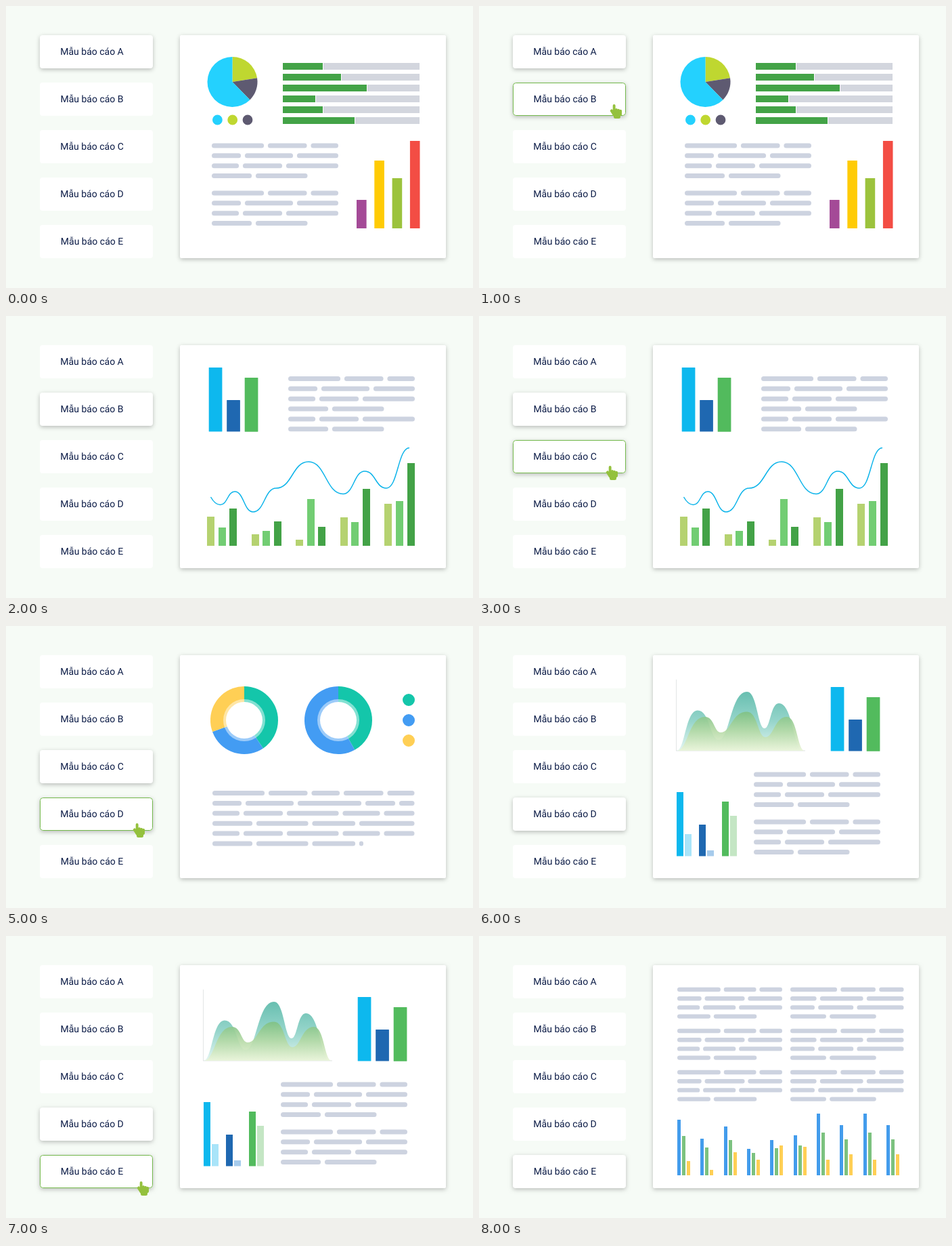
An HTML page with a canvas that plays this animation: 690 px wide and 416 px high, repeating every 9000 ms.

```html
<!DOCTYPE html>
<html lang="vi">
<head>
<meta charset="utf-8">
<style>
html, body { margin: 0; width: 690px; height: 416px; overflow: hidden; background: #f6fbf6; }
canvas { display: block; }
</style>
</head>
<body>
<canvas id="stage" width="690" height="416"></canvas>
<script>
const ctx = document.getElementById('stage').getContext('2d');
const STEP = 1000, STEPS = 9;
const GREY = '#cdd3e0', CYAN = '#0db8ee', NAVY = '#1f68b1', LEAF = '#52bb5d';
const TEAL = '#14c6aa', BLUE = '#439cf3', GOLD = '#ffcf55';

function rect(x, y, w, h, color) {
  ctx.fillStyle = color;
  ctx.fillRect(x, y, w, h);
}

function round(x, y, w, h, r, color) {
  ctx.fillStyle = color;
  ctx.beginPath();
  ctx.roundRect(x, y, w, h, r);
  ctx.fill();
}

// Angles in degrees, clockwise from the top
function slice(x, y, r, from, to, color) {
  const rad = a => (a - 90) * Math.PI / 180;
  ctx.fillStyle = color;
  ctx.beginPath();
  ctx.moveTo(x, y);
  ctx.arc(x, y, r, rad(from), rad(to));
  ctx.fill();
}

const dot = (x, y, r, color) => slice(x, y, r, 0, 360, color);

function pie(x, y, r, parts) {
  let from = 0;
  for (const [to, color] of parts) {
    slice(x, y, r, from, to, color);
    from = to;
  }
}

function card(x, y, w, h, r, raised) {
  ctx.save();
  if (raised) {
    ctx.shadowColor = 'rgba(0,0,0,.25)';
    ctx.shadowBlur = 6;
    ctx.shadowOffsetY = 2;
  }
  round(x, y, w, h, r, '#fff');
  ctx.restore();
}

// Level tangents at every point; high and low set how round crests and troughs are
function wave(points, high, low) {
  ctx.beginPath();
  ctx.moveTo(...points[0]);
  for (let i = 1; i < points.length; i++) {
    const [x0, y0] = points[i - 1], [x1, y1] = points[i];
    const w = x1 - x0, up = y1 < y0;
    ctx.bezierCurveTo(x0 + w * (up ? low : high), y0, x1 - w * (up ? high : low), y1, x1, y1);
  }
}

// Upright bars of the given heights
function columns(heights, x, step, w, base, color) {
  heights.forEach((h, i) => rect(Math.round(x + i * step), base - h, w, h, color));
}

// Middles of the gaps between dashes, one list per kind of text line
const CUTS = [[80, 143.5, 191, 255.5], [46, 123, 223, 273], [43, 107, 189.5, 250.5], [62, 144.5, 214]];

function dashes(kind, end, x, y, scale = 1) {
  const h = scale < 1 ? 6.4 : 7;
  let from = 0;
  for (const cut of [...CUTS[kind].filter(c => c < end), end + 2.9]) {
    round(x + from * scale, y - h / 2, (cut - 2.9 - from) * scale, h, h / 2, GREY);
    from = cut + 2.9;
  }
}

function paragraph(x, y, kinds = [0, 1, 2, 3], scale = 1) {
  const gap = scale < 1 ? 13.2 : 14.85;
  kinds.forEach((k, i) => dashes(k, k === 3 ? 141.5 : 187, x, y + i * gap, scale));
}

function trio(x, y) {
  [[94.5, 0, CYAN], [46.5, 48, NAVY], [79.8, 15, LEAF]].forEach(
    ([h, top, c], i) => round(x + i * 26.5, y + top, 19.7, h, 0.5, c));
}

function pageA() {
  const colors = ['#24d1fe', '#bfd730', '#5e5a71'];
  pie(334.5, 112, 37, [[81, colors[1]], [135.5, colors[2]], [360, colors[0]]]);
  colors.forEach((c, i) => dot(312.4 + i * 22.3, 168, 7.4, c));

  [59, 86, 124, 48, 59, 106].forEach((w, i) => {
    const y = 84 + i * 16;
    rect(409, y, 202, 10, '#d3d6de');
    rect(409, y, w + 1, 10, '#fff');
    rect(409, y, w, 10, '#43a347');
  });
  paragraph(304, 206);
  paragraph(304, 276);
  [[42, '#a44a97'], [100, '#ffcb05'], [74, '#9cc33d'], [129, '#f34d44']].forEach(
    ([h, c], i) => rect(518 + i * 26.3, 328 - h, 14.6, h, c));
}

function pageB() {
  trio(299.7, 76);
  paragraph(417, 92.5, [0, 1, 2, 3, 2, 3]);
  columns([43, 17, 9, 42, 62], 297, 65.6, 11, 339, '#b5d270');
  columns([27, 22, 69, 35, 66], 313.6, 65.6, 11, 339, '#72cd73');
  columns([55, 36, 28, 84, 122], 330.2, 65.6, 11, 339, '#43a247');

  wave([[316.5, 278.5], [338, 259], [365, 289], [399, 254], [447, 215], [498, 262.5],
        [530, 229], [562, 254], [596, 194.5]], 0.5, 0.5);
  ctx.moveTo(302.5, 267);
  ctx.quadraticCurveTo(309, 278.5, 316.5, 278.5);
  ctx.strokeStyle = '#0db4ea';
  ctx.lineWidth = 1.5;
  ctx.stroke();
}

function donut(x, y, parts) {
  pie(x, y, 50, parts);
  dot(x, y, 31, 'rgba(255,255,255,.47)');
  dot(x, y, 27, '#fff');
}

function pageC() {
  donut(352, 139, [[146, TEAL], [250, BLUE], [360, GOLD]]);
  donut(491, 139, [[151, TEAL], [360, BLUE]]);
  [TEAL, BLUE, GOLD].forEach((c, i) => dot(595, 109 + i * 30, 9, c));
  [0, 1, 2, 3, 2, 3].forEach((kind, i) => {
    dashes(kind, i < 5 ? 298.5 : 223, 305, 246.5 + i * 14.9);
  });
}

function hill(points, top, colors) {
  const fill = ctx.createLinearGradient(0, top, 0, 184);
  colors.forEach((c, i) => fill.addColorStop(i / (colors.length - 1), c));
  wave(points, 0.58, 0.4);
  ctx.closePath();
  ctx.fillStyle = fill;
  ctx.fill();
}

function pageD() {
  rect(291, 79, 1, 105, '#e3e5e6');
  rect(291, 183.5, 191, 1, '#dfe3e3');
  hill([[292, 184], [323, 124.5], [354, 168], [396, 97], [422, 151], [443, 114], [479, 184]],
    97, ['#68bfb0', '#96d5cb', '#e4f6f3']);
  hill([[292, 184], [334, 134], [357, 157], [396, 126.5], [423, 164], [455, 134], [481, 184]],
    126, ['rgba(126,193,133,.95)', 'rgba(180,217,164,.88)', 'rgba(234,244,216,.9)']);
  trio(519.7, 90);

  [[94.5, CYAN, 32.5, '#a9e4f9'], [46.5, NAVY, 8.5, '#a6cbec'], [80.5, LEAF, 59.5, '#c4e6c4']].forEach(
    ([h, c, low, light], i) => {
      const x = Math.round(292 + i * 33.4);
      rect(x, 339.5 - h, 10, h, c);
      rect(x + 12, 339.5 - low, 10, low, light);
    });
  paragraph(406, 219);
  paragraph(406, 289);
}

function pageE() {
  for (let y = 79; y < 202; y += 61) {
    paragraph(293, y, undefined, 0.829);
    paragraph(460, y, undefined, 0.896);
  }
  const repeatLast = list => [...list, ...list.slice(-2)];
  const blue = repeatLast([82, 54, 72, 39, 52, 59, 91, 74]);
  const gold = repeatLast([21, 8, 34, 23, 44, 42, 23, 31]);
  columns(blue, 293, 34.35, 5, 353, '#439cec');
  columns(blue.map(h => Math.round(h * 0.58 + 10)), 300, 34.35, 5, 353, '#7cc27f');
  columns(gold, 307, 34.35, 5, 353, GOLD);
}

const pages = [pageA, pageB, pageC, pageD, pageE];

function hand(x, y) {
  const color = '#94c13d';
  round(x + 4.7, y, 3.9, 16, 1.95, color);
  for (let i = 0; i < 3; i++) round(x + 8 + i * 3.1, y + 5.9 + i * 0.9, 3.8, 9, 1.9, color);
  round(x + 4.2, y + 9, 13.7, 8.5, [0, 0, 4, 4], color);
  round(x + 6, y + 12, 10, 9, 2.5, color);
  ctx.save();
  ctx.translate(x + 1.6, y + 8);
  ctx.rotate(-0.6);
  round(-1.9, 0, 4.2, 13, 2, color);
  ctx.restore();
}

function button(i, active, hover) {
  const y = 43 + i * 70;
  card(50, y, 167, 49, 4, active || hover);
  if (hover) {
    ctx.strokeStyle = '#74b94c';
    ctx.lineWidth = 1;
    ctx.beginPath();
    ctx.roundRect(50.5, y + 0.5, 166, 48, 4);
    ctx.stroke();
  }
  ctx.fillStyle = '#0c1c47';
  ctx.fillText('Mẫu báo cáo ' + 'ABCDE'[i], 127, y + 29);
}

const stops = [[193, 145], [187, 221], [187, 291], [193, 362]];

function draw(now) {
  const step = Math.floor(now / STEP) % STEPS;
  const active = step >> 1;
  const hover = step % 2 ? active + 1 : -1;

  rect(0, 0, 690, 416, '#f6fbf6');
  ctx.font = '14px Roboto, sans-serif';
  ctx.textAlign = 'center';
  ctx.textRendering = 'geometricPrecision';
  for (let i = 0; i < pages.length; i++) button(i, i === active, i === hover);
  card(257, 43, 393, 329, 2, true);
  pages[active]();
  if (hover > 0) hand(...stops[active]);
}

const start = performance.now();
function frame() {
  draw(performance.now() - start);
  requestAnimationFrame(frame);
}
frame();
</script>
</body>
</html>
```
